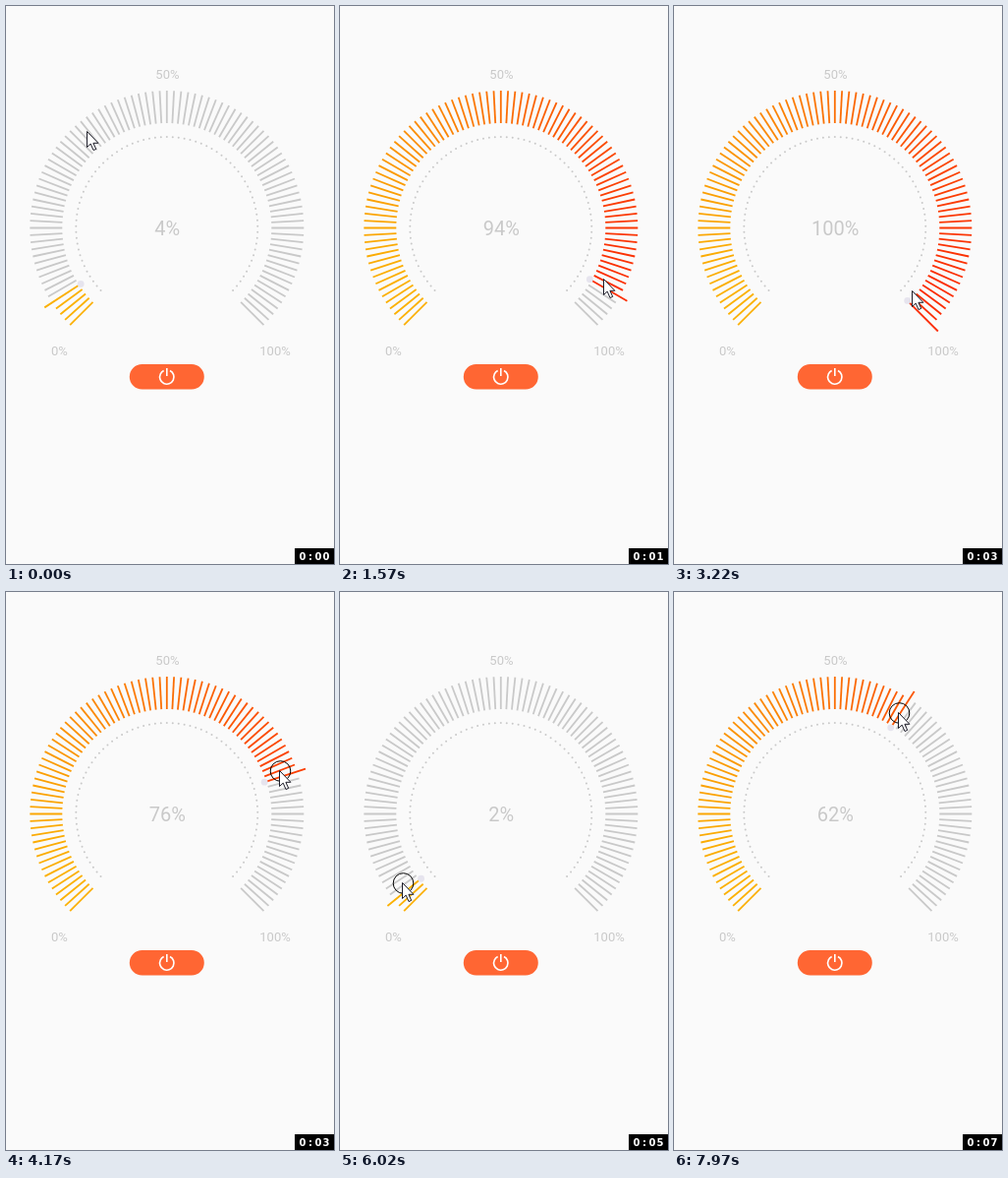
An HTML page with a canvas for the animation above (8 s loop, 334 by 567 pixels).

```html
<!DOCTYPE html>
<html lang="en">
<head>
<meta charset="utf-8">
<title>Dial</title>
<style>
html, body { margin: 0; width: 100%; height: 100%; overflow: hidden; background: #fafafa; }
canvas { display: block; width: 334px; height: 567px; }
</style>
</head>
<body>
<canvas id="stage" width="334" height="567"></canvas>
<script>
const ctx = document.getElementById('stage').getContext('2d');
const LOOP = 8000, FRAME = 130, STEPS = 90, START = 4;
const CX = 163.8, CY = 225.5, GRIP = 122, GRAY = '#c9c9c9';

// Each drag turns the dial from one tick to another while the button is down.
const drags = [
  { down: 130, up: 140, from: 30, to: 30 },
  { down: 650, up: 1500, from: 56, to: 85 },
  { down: 1850, up: 2740, from: 86, to: 90 },
  { down: 3520, up: 4335, from: 89, to: 66 },
  { down: 4800, up: 5840, from: 35, to: 2 },
  { down: 6290, up: 7065, from: 2, to: 28 },
  { down: 7650, up: 7940, from: 45, to: 56 },
];

const mix = (a, b, p) => a + (b - a) * p;
const clamp = p => Math.min(1, Math.max(0, p));
const smooth = p => p * p * (3 - 2 * p);

// Dial value, pointer tick and radius, and button state at time t.
function pose(t) {
  const last = drags.findLast(d => d.down <= t);
  const next = drags.find(d => d.down > t);
  if (!last) {
    const rest = 1 - t / next.down;
    return { value: START, tick: next.from + 1.3 * rest, radius: GRIP + 6 * rest, pressed: false };
  }
  const value = mix(last.from, last.to, smooth(clamp((t - last.down) / (last.up - last.down))));
  const held = t <= last.up || !next || next.from === last.to;
  if (held) return { value, tick: value, radius: GRIP, pressed: true };
  const p = (t - last.up) / (next.down - last.up);
  const dip = 21 * Math.sin(Math.PI * p) ** 2;
  return { value, tick: mix(last.to, next.from, p), radius: GRIP - dip, pressed: false };
}

function polar(tick, r) {
  const a = (135 + tick * 3) * Math.PI / 180;
  return [CX + r * Math.cos(a), CY + r * Math.sin(a)];
}

function disc(x, y, r, color) {
  ctx.fillStyle = color;
  ctx.beginPath();
  ctx.arc(x, y, r, 0, Math.PI * 2);
  ctx.fill();
}

function label(text, x, y, size, color = GRAY, font = 'Roboto, sans-serif') {
  ctx.fillStyle = color;
  ctx.font = `${size} ${font}`;
  ctx.textAlign = 'center';
  ctx.fillText(text, x, y);
}

function drawDial(value) {
  ctx.lineWidth = 1.8;
  for (let i = 0; i <= STEPS; i++) {
    const hue = mix(42, 10, smooth(i / STEPS));
    ctx.strokeStyle = i <= value ? `hsl(${hue}, 97%, 50%)` : GRAY;
    ctx.beginPath();
    ctx.moveTo(...polar(i, 106.5));
    ctx.lineTo(...polar(i, i === value ? 148.5 : 139.5));
    ctx.stroke();
  }
  for (let i = 0; i <= 72; i++) disc(...polar(mix(0.56, STEPS - 0.56, i / 72), 92.5), 1, GRAY);
  disc(...polar(value, 104.5), 3.4, '#e6e4ee');
  label(Math.floor(value / STEPS * 100) + '%', CX + 0.5, 233, '20px');
  label('0%', 54.4, 355, '13px');
  label('50%', CX + 0.6, 74, '13px');
  label('100%', 274, 355, '13px');
}

function drawButton() {
  ctx.fillStyle = '#ff6633';
  ctx.beginPath();
  ctx.roundRect(CX - 38, 364, 76, 25.5, 12.75);
  ctx.fill();
  ctx.strokeStyle = '#fff';
  ctx.lineWidth = 1.6;
  ctx.beginPath();
  ctx.arc(CX, 377, 7.2, -Math.PI / 2 + 0.45, Math.PI * 1.5 - 0.45);
  ctx.moveTo(CX, 368);
  ctx.lineTo(CX, 376);
  ctx.stroke();
}

function drawPointer({ tick, radius, pressed }) {
  // The hand grips slightly towards the top of the arc.
  const grip = tick + (STEPS / 2 - tick) / 30;
  const [x, y] = polar(grip, radius).map(Math.round);
  ctx.lineWidth = 1;
  if (pressed) {
    ctx.strokeStyle = '#000';
    ctx.beginPath();
    ctx.arc(x + 1.5, y + 1, 10.3, 0, Math.PI * 2);
    ctx.stroke();
  }
  const arrow = [[0, 0], [0, 16], [3.7, 12.6], [6.5, 19], [9.2, 17.9], [6.4, 11.8], [11.4, 11.8]];
  ctx.beginPath();
  arrow.forEach(([dx, dy]) => ctx.lineTo(x + dx + 0.5, y + dy + 0.5));
  ctx.closePath();
  ctx.fillStyle = '#fff';
  ctx.fill();
  ctx.strokeStyle = '#1c1c28';
  ctx.stroke();
}

function drawClock(t) {
  ctx.fillStyle = '#000';
  ctx.fillRect(294, 551, 40, 16);
  const seconds = Math.max(0, Math.floor((t - 205) / 1000));
  [...`0:0${seconds}`].forEach((char, i) =>
    label(char, 302 + i * 8, 562.5, 'bold 10px', '#fff', '"DejaVu Sans", sans-serif'));
}

function render(now) {
  const t = now % LOOP;
  const state = pose(Math.floor(t / FRAME) * FRAME);
  ctx.fillStyle = '#fafafa';
  ctx.fillRect(0, 0, 334, 567);
  drawDial(Math.round(state.value));
  drawButton();
  drawPointer(state);
  drawClock(t);
}

let origin;
function animate(now) {
  origin ??= now;
  render(now - origin);
  requestAnimationFrame(animate);
}
render(0);
requestAnimationFrame(animate);
</script>
</body>
</html>
```
